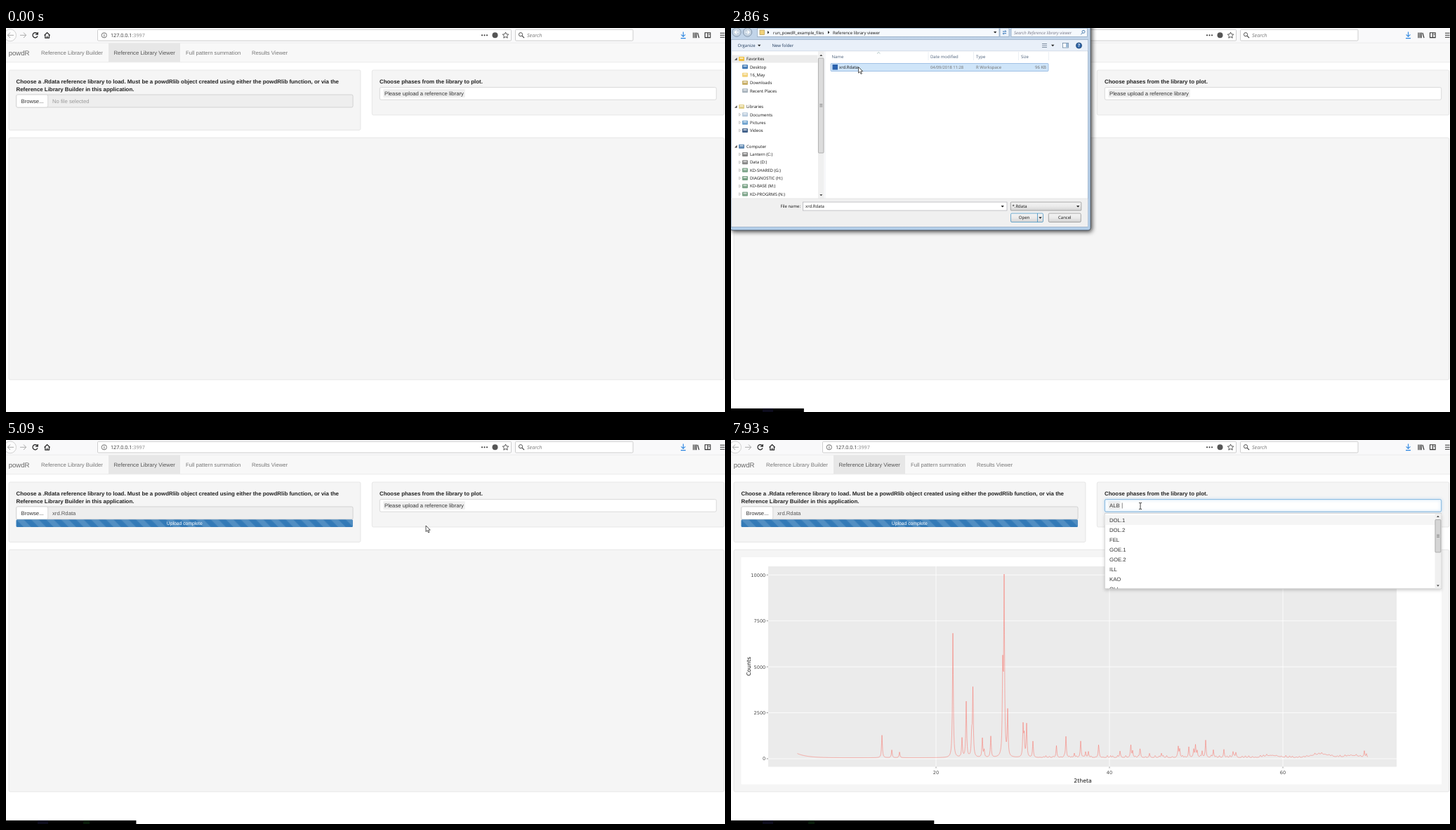
Recreate the animation shown at these times as an HTML page. Size 1024 by 547 pixels, loop 8 s.

```html
<!DOCTYPE html>
<html lang="en">
<head>
<meta charset="utf-8">
<title>Reference Library Viewer</title>
<style>
html, body { margin: 0; width: 100%; height: 100%; overflow: hidden; background: #fff; }
#stage { position: relative; width: 100%; height: 100%; overflow: hidden; contain: strict; }
svg { position: absolute; left: 0; top: 0; overflow: hidden; }
text { font-family: "Liberation Sans", Arial, sans-serif; text-rendering: geometricPrecision; white-space: pre; }
.ui text { font-family: "Open Sans", "Noto Sans", sans-serif; }
.axis text { font-family: "DejaVu Sans", sans-serif; }
#dialog { position: absolute; left: 0; top: 0; transform-origin: 0 0; }
#window { overflow: visible; }
</style>
</head>
<body>
<div id="stage">
<svg id="page" width="1024" height="547"></svg>
<div id="dialog"><svg id="window" class="ui" width="520" height="300"></svg></div>
<svg id="top" width="1024" height="547"></svg>
</div>
<script>
const $ = id => document.getElementById(id);
const rect = (x, y, w, h, fill, stroke = 'none', more = '') =>
  `<rect x="${x}" y="${y}" width="${w}" height="${h}" fill="${fill}" stroke="${stroke}" stroke-width=".7" ${more}/>`;
const text = (x, y, size, str, fill = '#333', more = '') =>
  `<text x="${x}" y="${y}" font-size="${size}" fill="${fill}" ${more}>${str}</text>`;
const line = (d, stroke = '#333', w = 1, fill = 'none') =>
  `<path d="${d}" stroke="${stroke}" stroke-width="${w}" fill="${fill}"/>`;
const dot = (x, y, r, fill, stroke = 'none') =>
  `<circle cx="${x}" cy="${y}" r="${r}" fill="${fill}" stroke="${stroke}" stroke-width=".9"/>`;
const group = (id, body, more = '') => `<g id="${id}" ${more}>${body}</g>`;
const bold = 'font-weight="700"', mid = 'text-anchor="middle"', end = 'text-anchor="end"';

function browserBar() {
  return group('browser',
    rect(0, 0, 1024, 21, '#f9f9fa') + line('M0 21.3H1024', '#dcdcdc', .7) +
    dot(6, 10.3, 8.5, '#fcfcfc', '#ccc') +
    line('M11 10.3H2.5M6 6.5L2.3 10.3 6 14', '#aaa') +
    line('M20 10.3h8.5M25 6.5l3.7 3.8-3.7 3.7', '#aaa') +
    line('M44.6 8.2A3.6 3.6 0 1 0 45 11.5M45.3 6v3.2h-3.3', '#222', 1.2) +
    line('M54.6 10.5l4-3.9 4 3.9M55.8 10v4.2h5.6V10M58.6 14v-2.5', '#222', 1.2) +
    rect(130.5, 2.3, 589, 15.8, '#fff', '#bbb', 'rx="1.2"') +
    dot(139.8, 10.3, 3.6, 'none', '#666') + line('M139.8 9.6v2.8M139.8 8v.9', '#555', .9) +
    text(149, 13, 7.2, '127.0.0.1<tspan fill="#888">:3997</tspan>') +
    [678, 681.5, 685].map(x => dot(x, 10.3, 1.1, '#444')).join('') +
    dot(696.5, 10.2, 4, '#555') +
    line('M711.5 6l1.3 2.8 3 .3-2.2 2.1.6 3-2.7-1.5-2.7 1.5.6-3-2.2-2.1 3-.3z', '#444', .9) +
    rect(725.5, 2.3, 167.5, 15.8, '#fff', '#bbb', 'rx="1.2"') +
    dot(733, 9.2, 2.6, 'none', '#444') + line('M735 11.2l3 3', '#444', 1.2) +
    text(742, 13, 7.2, 'Search', '#777', 'font-style="italic"') +
    line('M964.5 5.5v6.5M961.6 9.4l2.9 2.9 2.9-2.9M961 14.6h7', '#2a84e0', 1.1) +
    line('M979 6.5v7.8M981.3 6.5v7.8M983.3 6.5v7.8M985 6.8l2 7.4', '#333', 1.2) +
    line('M995.5 6.8h7.6v6.8h-7.6zM999.5 7v6.5M1000.8 9h1.5', '#333', 1.1) +
    line('M1017 7.3h6.5M1017 10.3h6.5M1017 13.3h6.5', '#333', 1.1), 'class="ui"');
}

function stripedBar(id, width, label) {
  return group(id, rect(14.5, 113.3, width, 10.6, '#337ab7', 'none', 'rx="1.5"') +
    rect(14.5, 113.3, width, 10.6, 'url(#stripes)', 'none', 'rx="1.5"') +
    text(14.5 + width / 2, 121, 6.8, label, '#fff', mid));
}

const peaks = [
  215,32, 229,11, 240,8, 316,177, 329,27, 335,79, 342.8,30, 344.5,96, 358,27, 360.5,10, 370,30,
  387,118, 389,247, 394,64, 416,44, 417.5,28, 421,47, 430,23, 463.5,16, 477,30, 489,6, 498,22,
  505,8, 509,8, 523.5,17, 554,9, 569.5,16, 572,9, 582.5,11, 596,6, 613,6, 637,15, 639,11, 652,14,
  659,11, 661.5,17, 664,9, 671,9, 676,24, 687,11, 702,10, 715,8, 719,7, 902,9, 905,5
];
function curve() {
  let seed = 11;
  const rnd = () => (seed = seed * 16807 % 2147483647) / 2147483647;
  const small = [];
  for (let x = 440; x < 900; x += 3 + 5 * rnd()) small.push(x, .5 + 2.5 * rnd());
  const all = peaks.concat(small);
  const hump = (x, c, w, h) => h * Math.exp(-(((x - c) / w) ** 2));
  let d = '';
  for (let x = 94.5; x <= 907; x += .5) {
    let h = 6 * Math.exp((94.5 - x) / 14) +
      hump(x, 770, 14, 3) + hump(x, 840, 18, 5) + hump(x, 885, 14, 3);
    for (let i = 0; i < all.length; i += 2) h += all[i + 1] * .5 / (.5 + (x - all[i]) ** 2);
    d += (d ? 'L' : 'M') + x + ' ' + (452.6 - h).toFixed(2);
  }
  return line(d, '#f8766d', .55);
}

function plot() {
  let s = rect(14.5, 167, 997.5, 323.5, '#fff') + rect(53, 180, 895, 285.5, '#ebebeb');
  for (let i = 0; i < 5; i++) {
    const y = 454 - 65.45 * i;
    s += line(`M53 ${y}H948`, '#fff', .8) + line(`M50.5 ${y}H53`, '#555', .6) +
      text(49.3, y + 2.4, 6.6, 2500 * i, '#4d4d4d', end);
  }
  for (let i = 0; i < 3; i++) {
    const x = 292 + 247 * i;
    s += line(`M${x} 180V465.5`, '#fff', .8) + line(`M${x} 465.5v2`, '#555', .6) +
      text(x, 476, 6.6, 20 + 20 * i, '#4d4d4d', mid);
  }
  return group('plot', s + curve() + text(501, 488, 7.8, '2theta', '#111', mid) +
    text(0, 0, 7.8, 'Counts', '#111', mid + ' transform="translate(27.7 322.5) rotate(-90)"'), 'class="axis"');
}

function dropdown() {
  const items = ['DOL.1', 'DOL.2', 'FEL', 'GOE.1', 'GOE.2', 'ILL', 'KAO', 'OLI'];
  return group('menu',
    rect(532.3, 84.6, 479.4, 17.6, 'none', '#66afe9', 'rx="2" style="filter:drop-shadow(0 0 2px #66afe9)"') +
    line('M557.2 89.5v8', '#333', .6) +
    rect(532.3, 104.5, 479.4, 107.3, '#fff', '#ccc', 'style="filter:drop-shadow(0 2px 2px #0003)"') +
    rect(532.6, 107, 470, 14, '#f5f5f5') +
    '<svg x="532" y="104" width="470" height="107.5">' +
    items.map((s, i) => text(7, 12.7 + 14 * i, 7.7, s)).join('') + '</svg>' +
    rect(1002.5, 105, 8.8, 106.5, '#f0f0f0') +
    rect(1002.9, 113.5, 8, 46.5, '#d5d5d5', '#999', 'rx="1"') +
    line('M1005 135h4M1005 136.7h4M1005 138.4h4', '#666', .6) +
    line('M1005 110l1.9-2.2 1.9 2.2zM1005 206.5l1.9 2.2 1.9-2.2z', 'none', 0, '#444'));
}

const tile = 21.333, half = tile / 2;
$('page').innerHTML =
  `<defs><pattern id="stripes" patternUnits="userSpaceOnUse" x="14.5" y="113.3" width="${tile}" height="${tile}">
    <path fill="#fff" fill-opacity=".15" d="M0 ${tile}H${half}L0 ${half}zM0 0H${half}L${tile} ${half}V${tile}z"/></pattern></defs>` +
  browserBar() +
  rect(0, 21.6, 1024, 27, '#f8f8f8') + line('M0 48.7H1024', '#e3e3e3', .7) +
  rect(146, 21.6, 102, 26.8, '#e7e7e7') +
  text(3.7, 38.6, 9.6, 'powdR', '#666') +
  text(50, 37.7, 7.75, 'Reference Library Builder', '#777') +
  text(153.5, 37.7, 7.75, 'Reference Library Viewer', '#555') +
  text(256, 37.7, 7.7, 'Full pattern summation', '#777') +
  text(350, 37.7, 7.7, 'Results Viewer', '#777') +
  [[4, 60, 501, 85.4], [521.3, 60, 501.4, 64], [4, 156.4, 1018.7, 344.6]]
    .map(b => rect(...b, '#f5f5f5', '#dedede', 'rx="2"')).join('') +
  text(14.5, 78.7, 7.9, 'Choose a .Rdata reference library to load. Must be a powdRlib object created using either the powdRlib function, or via the', '#222', bold) +
  text(14.5, 89.7, 7.9, 'Reference Library Builder in this application.', '#222', bold) +
  rect(14.7, 95, 479.4, 18, '#eee', '#c4c4c4', 'rx="2"') +
  rect(14.7, 95, 45, 18, '#fff', '#ccc', 'rx="2"') +
  text(21.5, 106.8, 7.7, 'Browse...') +
  group('noFile', text(66, 106.8, 7.7, 'No file selected', '#999')) +
  group('file', text(66, 106.8, 7.7, 'xrd.Rdata', '#555')) +
  stripedBar('uploading', 46, 'Upload') + stripedBar('uploaded', 479.5, 'Upload complete') +
  text(532, 78.7, 7.9, 'Choose phases from the library to plot.', '#222', bold) +
  rect(532.3, 84.6, 479.4, 17.6, '#fff', '#ccc', 'rx="2"') +
  group('prompt', rect(537.3, 87.3, 116.5, 11.8, '#efefef', 'none', 'rx="1"') +
    text(539, 95.9, 7.7, 'Please upload a reference library')) +
  group('phase', rect(537.3, 87.3, 17.2, 11.8, '#efefef', 'none', 'rx="1"') + text(539, 95.9, 7.7, 'ALB')) +
  plot() + dropdown();

function sidebar() {
  // row, label, icon colour; headings sit further left
  const rows = [
    [0, 'Favorites', '#f0c040'], [1, 'Desktop', '#3f78b5'], [2, '16_May', '#f2d27a'],
    [3, 'Downloads', '#c9b06a'], [4, 'Recent Places', '#a9b4bd'],
    [6, 'Libraries', '#e0cf8a'], [7, 'Documents', '#b9cbdc'], [8, 'Pictures', '#6fa3cf'], [9, 'Videos', '#45648c'],
    [11, 'Computer', '#5c86b0'], [12, 'Lantern (C:)', '#888'], [13, 'Data (D:)', '#888'],
    [14, 'KD-SHARED (G:)', '#7aa287'], [15, 'DIAGNOSTIC (H:)', '#7aa287'],
    [16, 'KD-BASE (M:)', '#7aa287'], [17, 'KD-PROGRMS (N:)', '#7aa287']
  ];
  return rows.map(([i, label, color]) => {
    const y = 44 + 11.33 * i, head = i % 11 == 0 || i == 6, x = head ? 22 : 27;
    const mark = head ? line(`M5 ${y + 1.8}h3.6v-3.6z`, 'none', 0, '#444')
      : i > 6 ? line(`M11.5 ${y - 2}l2.4 2-2.4 2z`, '#aaa', .6) : '';
    return mark + rect(x - 11, y - 3, 8, 6, color, 'none', 'rx="1"') +
      rect(x - 9.5, y - 2, 5, 2, '#fff', 'none', 'opacity=".6"') + text(x, y + 2.2, 6, label, '#111');
  }).join('');
}

const slate = '#4c607a', down = (x, y) => line(`M${x} ${y}h4.4l-2.2 2.5z`, 'none', 0, '#222');
$('window').innerHTML =
  `<defs><linearGradient id="glass" x2="0" y2="1"><stop stop-color="#c3d5e9"/><stop offset="1" stop-color="#b4cfea"/></linearGradient>
   <linearGradient id="button" x2="0" y2="1"><stop stop-color="#f3f3f3"/><stop offset=".5" stop-color="#ebebeb"/><stop offset="1" stop-color="#d2d2d2"/></linearGradient></defs>` +
  rect(-1, -22, 513, 310, 'url(#glass)', '#3c4754', 'rx="3" style="filter:drop-shadow(2px 2px 3px #000b)"') +
  text(14, -11, 6, 'File Upload', '#111') + rect(480, -21, 26, 10, '#c6523f', '#6b2f26', 'rx="1.5"') +
  dot(8, 6, 6.2, '#c6d4e2', '#7b90a8') + dot(23.5, 6, 6.2, '#c6d4e2', '#7b90a8') +
  line('M11 6H5.5M8 3.5L5.3 6 8 8.5M20.5 6H26M23.5 3.5L26.2 6l-2.7 2.5', '#fff', 1.1) +
  rect(37.5, .3, 344.5, 12, '#f5f9fd', '#8ba3bd') + rect(383, .3, 13, 12, '#edf3fa', '#8ba3bd') +
  rect(41, 3, 6.5, 6.5, '#f2d27a', '#b69a4a') + line('M52 4l2.4 2.2L52 8.5zM138 4l2.4 2.2-2.4 2.3z', 'none', 0, '#222') +
  text(60, 8.6, 6, 'run_powdR_example_files', '#111') + text(145, 8.6, 6, 'Reference library viewer', '#111') +
  down(374, 5) + line('M387 5h5l-1.6-1.5M392 7.7h-5l1.6 1.5', '#3575b8') +
  rect(399, .3, 108.5, 12, '#f5f9fd', '#8ba3bd') +
  text(403, 8.6, 6, 'Search Reference library viewer', '#778', 'font-style="italic"') +
  dot(502, 5.3, 2, 'none', '#4679ab') + line('M500.7 6.7l-2.3 2.6', '#4679ab') +
  rect(.5, 16.5, 508, 267, '#fff', '#8fa6bf') + rect(.8, 17, 507.4, 15.5, '#e9f0f9') + line('M0 32.7H508', '#c3d0e0', .7) +
  text(9.5, 27, 6, 'Organize', '#1e395b') + down(38, 23.8) + text(58.5, 27, 6, 'New folder', '#1e395b') +
  line('M443 22.5h7M443 25h7M443 27.5h7', '#66788c', .8) + down(456, 23.8) +
  rect(472.5, 21.5, 8, 6.5, '#fff', '#5b7896') + rect(477, 22, 3.2, 5.6, '#9dbbd8') +
  dot(495.5, 25, 4, '#2f66a8', '#234a78') + text(495.5, 27.4, 6.3, '?', '#fff', mid + ' ' + bold) +
  rect(.8, 38.5, 122.7, 11, '#ececec') +
  group('hoverRow', rect(.5, 84, 123, 11, '#eaf4fd', '#c2dff5', 'rx="1"')) +
  sidebar() +
  rect(124, 33, 8.5, 210, '#f0f0f0') + rect(124.4, 43, 7.6, 135, '#dcdcdc', '#9a9a9a', 'rx="1"') +
  line('M126.3 108.5h4M126.3 110.2h4M126.3 112h4', '#666', .6) +
  line('M126.3 40l2-2.3 2 2.3zM126.3 237l2 2.3 2-2.3z', 'none', 0, '#444') +
  line('M134 33V243', '#e5eaf0', .7) + line('M281 34v12M345.5 34v12M409.5 34v12M452.5 34v12', '#e2e8ef', .7) +
  line('M208 36.5l2.2-2 2.2 2', '#8aa', .7) +
  text(143.5, 42.7, 6, 'Name', slate) + text(284, 42.7, 6, 'Date modified', slate) +
  text(349, 42.7, 6, 'Type', slate) + text(413, 42.7, 6, 'Size', slate) +
  group('selectedRow', rect(142, 50.5, 310, 11, '#cfe5f9', '#84acdd', 'rx="1"')) +
  rect(144.5, 52, 7.5, 7.5, '#2b63ae') + text(154, 58.2, 6, 'xrd.Rdata', '#111') +
  text(284, 58.2, 5.8, '04/09/2018 11:28', '#6d6d6d') + text(349, 58.2, 6, 'R Workspace', '#6d6d6d') +
  text(449, 58.2, 6, '96 KB', '#6d6d6d', end) +
  rect(.8, 243, 507.4, 40, '#f0f0f0') + line('M0 243H508', '#dfdfdf', .7) +
  text(99, 256.2, 6, 'File name:', '#111', end) + rect(102.5, 248, 290.5, 12, '#fff', '#abadb3') +
  group('fileName', text(106, 256.2, 6, 'xrd.Rdata', '#111')) + down(384.5, 253) +
  rect(398.3, 248, 100.5, 12, 'url(#button)', '#8a8a8a', 'rx="1"') + text(400.5, 256.2, 6, '*.Rdata', '#111') + down(492, 253) +
  rect(398.5, 264, 46, 12.5, 'url(#button)', '#3c8fc0', 'rx="1.5"') + line('M436.5 264v12.5', '#3c8fc0', .8) +
  text(417.5, 272.4, 6, 'Open', '#111', mid) + down(438.3, 269.2) +
  rect(452.3, 264, 46, 12.5, 'url(#button)', '#8a8a8a', 'rx="1.5"') + text(475.3, 272.4, 6, 'Cancel', '#111', mid);

$('top').innerHTML =
  '<svg id="bar" y="541.7" height="5.3" width="0">' +
  rect(0, 0, 400, 6, '#000') + rect(45, 0, 15, 6, '#0c0b1c') + rect(110, 0, 9, 6, '#061a08') + '</svg>' +
  group('arrow', line('M0 0V8.6l2-1.9 1.5 3.3 1.4-.6L3.5 6.2h2.7z', '#111', .7, '#fff')) +
  group('hand', line('M-.9 0q.9-1 1.8 0v4.2q3.6.3 4.7 1.4v3.2L4.3 11.6H-.6L-3.5 7.2q.2-1.4 1.5-.7L-.9 7.4z', '#111', .8, '#fff')) +
  group('beam', line('M-2-4.5h1.3L0-4l.7-.5H2M-2 4.5h1.3L0 4l.7.5H2M0-4V4', '#111', .8));

// pointer stops: step, x, y, shape
const stops = [
  [1, 858, 260, 'arrow'], [4, 130, 95, 'beam'], [5, 29.5, 106.5, 'hand'], [7, 29.5, 106.5, 'hand'],
  [8, 29.5, 106.5, 'arrow'], [11, 107, 86, 'arrow'], [13, 181.5, 55.5, 'arrow'], [18, 181.5, 55.5, 'arrow'],
  [19, 258, 98.5, 'beam'], [20, 400, 118, 'arrow'], [23, 598, 122, 'arrow'], [36, 598, 122, 'arrow'],
  [37, 583, 94, 'beam'], [40, 583, 94, 'beam']
];
function pointer(n) {
  const i = Math.max(0, stops.findLastIndex(s => s[0] <= n)), a = stops[i], b = stops[i + 1] || a;
  const k = a == b ? 0 : Math.max(0, (n - a[0]) / (b[0] - a[0]));
  for (const shape of ['arrow', 'hand', 'beam']) show(shape, n > 0 && a[3] == shape);
  $(a[3]).setAttribute('transform', `translate(${a[1] + (b[1] - a[1]) * k} ${a[2] + (b[2] - a[2]) * k})`);
}

const show = (id, on) => $(id).style.display = on ? '' : 'none';

// tilt about the axis x = cx: depth = a + b*y, height = c + d*y
const tilt = (cx, a, b, c, d) =>
  `translateX(${cx}px) matrix3d(1,0,0,0, 0,${d},0,${b}, 0,0,1,0, 0,${c},0,${a}) translateX(${-cx}px)`;

function draw(t) {
  const n = Math.floor((t + 20) / 203.4);
  const opening = n == 7, closing = n == 16;
  $('bar').setAttribute('width', 7.417 * n);
  show('dialog', n >= 7 && n <= 16);
  $('dialog').style.opacity = opening ? .12 : closing ? .38 : 1;
  $('dialog').style.transform = opening ? tilt(255.5, 1.065, .000197, 4.7, 1.016)
    : closing ? tilt(215, 1.0758, -.00017, 11, .977) : 'none';
  show('hoverRow', n == 10 || n == 11);
  show('selectedRow', n >= 14);
  show('fileName', n >= 14);
  show('noFile', n < 16);
  show('file', n >= 16);
  show('uploading', closing);
  show('uploaded', n > 16);
  show('prompt', n < 33);
  show('phase', n >= 33);
  show('plot', n >= 33);
  show('menu', n >= 38);
  pointer(n);
}

const start = performance.now();
(function loop() {
  draw((performance.now() - start) % 8000);
  requestAnimationFrame(loop);
})();
</script>
</body>
</html>
```
